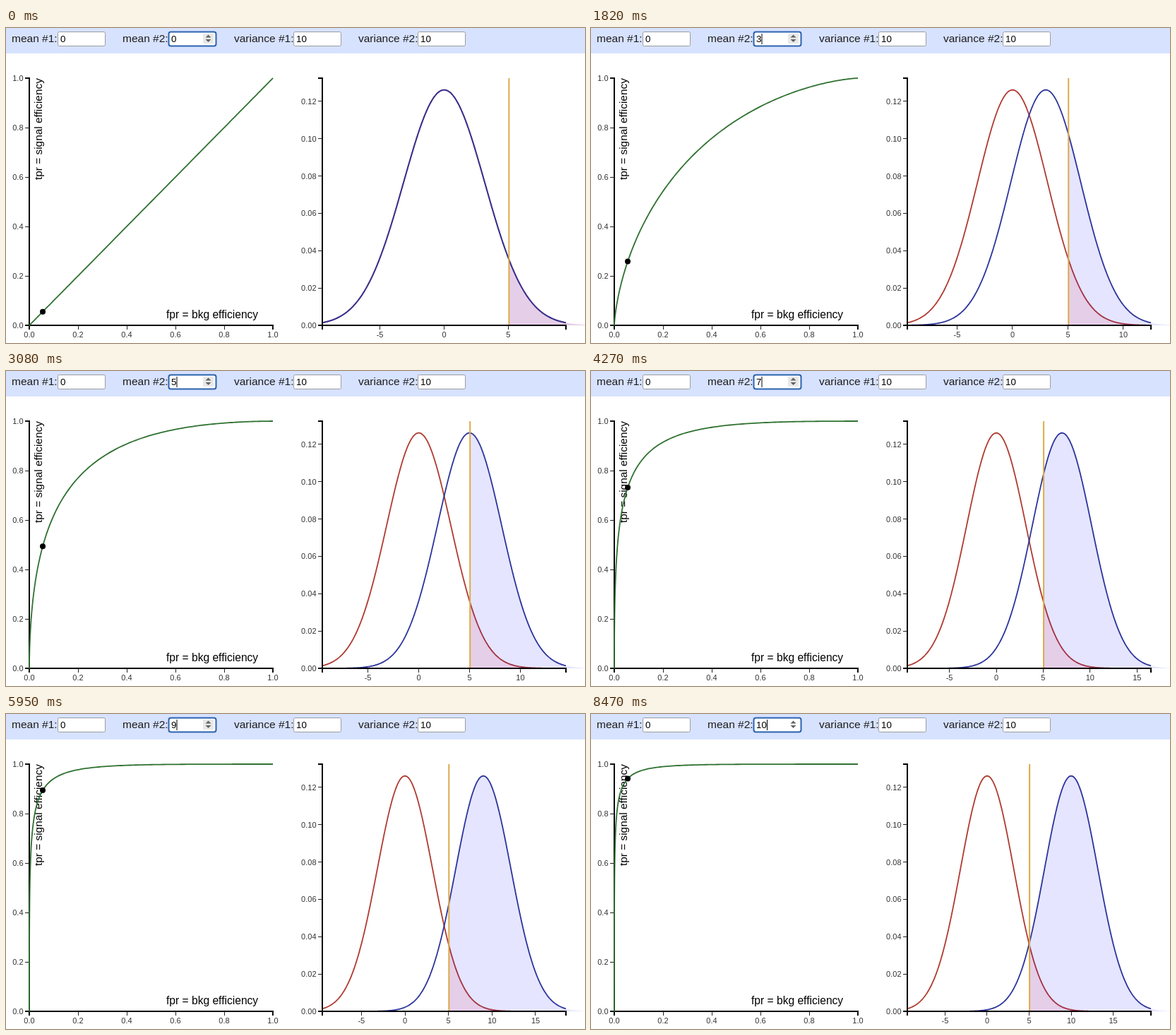
These frames come from a looping animation (820x446 px, 8.54 s). An HTML page with a canvas:

```html
<!DOCTYPE html>
<html lang="en">
<head>
<meta charset="utf-8">
<title>ROC curve of two Gaussians</title>
<style>
  html, body { margin: 0; width: 100%; height: 100%; overflow: hidden; background: #fff; }
  canvas { display: block; }
</style>
</head>
<body>
<canvas id="stage" width="820" height="446"></canvas>
<script>
const ctx = document.getElementById('stage').getContext('2d');
const LOOP = 8540;
const STEP_TIMES = [560, 1120, 1610, 2170, 2800, 3430, 4060, 4690, 5460, 6160];
const HOVER_END = 7700;
const SIGMA = Math.sqrt(10);
const CUT = 5.05;
const TOP = 71, BASE = 421, HEIGHT = BASE - TOP, WIDTH = 345;
const ROC_X = 33, PDF_X = 448;
const PEAK = 1 / (SIGMA * Math.sqrt(2 * Math.PI));
const Y_MAX = PEAK * 1.05;
const SANS = '"Liberation Sans", Arial, sans-serif';

const pdf = (x, mean) => PEAK * Math.exp(-((x - mean) ** 2) / 20);

// Upper tail of the normal distribution (Abramowitz-Stegun 7.1.26).
function tail(x, mean) {
  const z = (x - mean) / SIGMA / Math.SQRT2;
  const t = 1 / (1 + 0.3275911 * Math.abs(z));
  const poly = t * (0.254829592 + t * (-0.284496736 + t * (1.421413741 +
    t * (-1.453152027 + t * 1.061405429))));
  const q = poly * Math.exp(-z * z) / 2;
  return z < 0 ? 1 - q : q;
}

function text(str, x, y, size, align = 'left', color = '#000') {
  ctx.font = `${size}px ${SANS}`;
  ctx.textAlign = align;
  ctx.fillStyle = color;
  ctx.fillText(str, x, y);
}

function line(points, color, width) {
  ctx.beginPath();
  points.forEach(([x, y]) => ctx.lineTo(x, y));
  ctx.strokeStyle = color;
  ctx.lineWidth = width;
  ctx.stroke();
}

function shape(points, color) {
  ctx.beginPath();
  points.forEach(([x, y]) => ctx.lineTo(x, y));
  ctx.fillStyle = color;
  ctx.fill();
}

function field(label, labelX, boxX, value, focused) {
  text(label, labelX, 20, 15.5, 'left', '#1c1c1c');
  ctx.beginPath();
  ctx.roundRect(boxX + 0.5, 5.5, 67, 20, focused ? 3 : 2);
  ctx.fillStyle = '#fff';
  ctx.fill();
  ctx.strokeStyle = focused ? '#2b62ae' : '#9a9ca4';
  ctx.lineWidth = focused ? 2 : 1;
  ctx.stroke();
  text(value, boxX + 4, 20, 13.33);
}

function spinner(hovered) {
  if (hovered) {
    ctx.fillStyle = '#e8e8e8';
    ctx.fillRect(279, 8, 15, 14);
  }
  shape([[282.5, 13.5], [290.5, 13.5], [286.5, 9.5]], '#626262');
  shape([[282.5, 16], [290.5, 16], [286.5, 20]], '#626262');
}

function header(mean, caretOn, hovered) {
  ctx.fillStyle = '#d7e2ff';
  ctx.fillRect(0, 0, 820, 36);
  field('mean #1:', 8, 73, '0');
  field('mean #2:', 165, 230, String(mean), true);
  field('variance #1:', 323, 407, '10');
  field('variance #2:', 499, 583, '10');
  spinner(hovered);
  if (caretOn) {
    ctx.fillStyle = '#000';
    ctx.fillRect(234 + 7.5 * String(mean).length, 8, 1, 15);
  }
}

function axes(left, xTicks, yTicks) {
  line([[left - 6, TOP], [left, TOP], [left, BASE], [left - 6, BASE]], '#000', 2);
  line([[left, BASE + 6], [left, BASE], [left + WIDTH, BASE], [left + WIDTH, BASE + 6]], '#000', 2);
  for (const [x, label] of xTicks) {
    const px = Math.floor(x) + 0.5;
    line([[px, BASE], [px, BASE + 6]], '#222', 1);
    text(label, x, 438, 11, 'center', '#333');
  }
  for (const [y, label] of yTicks) {
    const py = Math.floor(y) + 0.5;
    line([[left - 6, py], [left, py]], '#222', 1);
    text(label, left - 8.5, y + 4, 11, 'right', '#333');
  }
}

function rocChart(mean) {
  const toX = v => ROC_X + v * WIDTH;
  const toY = v => BASE - v * HEIGHT;
  const ticks = [0, 0.2, 0.4, 0.6, 0.8, 1];
  axes(ROC_X, ticks.map(v => [toX(v), v.toFixed(1)]), ticks.map(v => [toY(v), v.toFixed(1)]));

  text('fpr = bkg efficiency', 227, 411, 15.6);
  ctx.save();
  ctx.translate(51, 215);
  ctx.rotate(-Math.PI / 2);
  text('tpr = signal efficiency', 0, 0, 15.4);
  ctx.restore();

  const curve = [];
  for (let x = mean + 16; x >= -16; x -= 0.1) curve.push([toX(tail(x, 0)), toY(tail(x, mean))]);
  line(curve, '#2f7130', 1.8);

  ctx.beginPath();
  ctx.arc(toX(tail(CUT, 0)), toY(tail(CUT, mean)), 4, 0, 2 * Math.PI);
  ctx.fillStyle = '#000';
  ctx.fill();
}

function pdfChart(mean) {
  const low = -3 * SIGMA, high = mean + 3 * SIGMA;
  const scale = WIDTH / (high - low);
  const toX = v => PDF_X + (v - low) * scale;
  const toY = v => BASE - v / Y_MAX * HEIGHT;
  const cutX = toX(CUT);
  const samples = (center, from, to) => {
    const points = [];
    for (let px = from; px <= to; px++) {
      points.push([px, toY(pdf(low + (px - PDF_X) / scale, center))]);
    }
    return points;
  };
  const area = (center, color) =>
    shape([[cutX, BASE], ...samples(center, cutX, 821), [821, BASE]], color);

  line(samples(0, PDF_X, PDF_X + WIDTH), '#b03a30', 1.8);
  area(0, 'rgba(255,0,0,.1)');
  area(mean, 'rgba(0,0,255,.1)');
  line(samples(mean, PDF_X, PDF_X + WIDTH), '#2c349b', 1.8);
  line([[cutX, TOP], [cutX, BASE]], '#dcab4b', 2);

  const xTicks = [], yTicks = [];
  for (let v = -5; v < high; v += 5) xTicks.push([toX(v), String(v)]);
  for (let i = 0; i <= 6; i++) yTicks.push([toY(i * 0.02), (i * 0.02).toFixed(2)]);
  axes(PDF_X, xTicks, yTicks);
}

function draw() {
  const t = performance.now() % LOOP;
  const mean = STEP_TIMES.filter(s => s <= t).length;
  const caretOn = mean > 0 && (t - STEP_TIMES[mean - 1]) % 1000 < 500;
  ctx.fillStyle = '#fff';
  ctx.fillRect(0, 0, 820, 446);
  header(mean, caretOn, t < HOVER_END);
  rocChart(mean);
  pdfChart(mean);
  requestAnimationFrame(draw);
}
draw();
</script>
</body>
</html>
```
